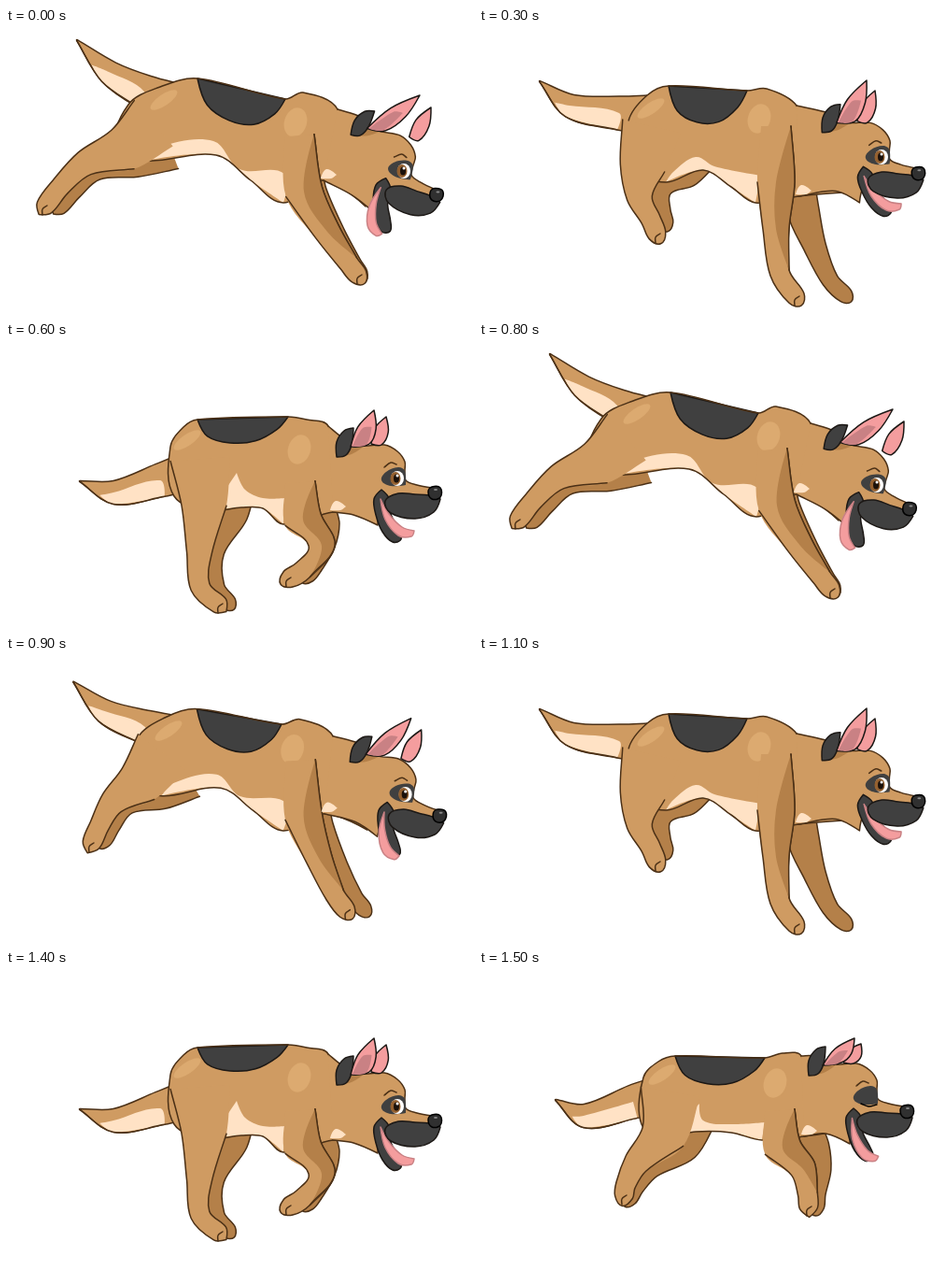
Recreate the animation shown at these times as an HTML page with a canvas. Size 500 by 306 pixels, loop 1600 ms.

```html
<!DOCTYPE html>
<html lang="en">
<head>
<meta charset="utf-8">
<title>Running dog</title>
<style>
html, body { margin: 0; width: 100%; height: 100%; overflow: hidden; background: #fff; }
canvas { display: block; width: 500px; height: 306px; }
</style>
</head>
<body>
<canvas id="stage" width="500" height="306"></canvas>
<script>
const ctx = document.getElementById('stage').getContext('2d');
const TAN = '#cf9b62', SHADE = '#b48049', LIGHT = '#dcaa70', CREAM = '#ffe2c5';
const DARK = '#404040', PINK = '#f49d9e', ROSE = '#c98184', LINE = '#4b3016', INK = '#1c1815';
const STEP = 100, STEPS = 16;

// Limb thickness from body to tip.
const HIND = [32, 24, 13.5, 10.5, 9.5];
const FORE = [16, 20, 14, 10.5, 9.5];
const TAIL = [20, 18, 12.5, 0.5];
const slim = radii => radii.map(r => r * 0.85);

// Key poses. face: eye x, eye y, tilt, jaw turn, tongue turn.
// ears: near tip, far tip, shift of the far base.
const reach = {
  torso: [205, 54, 299, 76, 318, 69, 355, 87, 340, 163, 297, 187, 262, 163, 225, 136, 150, 142, 118, 128, 131, 82, 165, 63],
  cream: [165, 127, 222, 121, 250, 151, 298, 156],
  hind: [158, 102, 125, 130, 84, 145, 58, 170, 41, 192],
  farHind: [175, 125, 135, 140, 95, 152, 72, 175, 56, 193],
  fore: [314, 115, 319, 175, 344, 218, 367, 252, 378, 266],
  farFore: [325, 150, 327, 178, 352, 222, 372, 253, 380, 265],
  tail: [185, 80, 148, 68, 110, 47, 76, 13],
  face: [425, 153, 15, 2, 30], ears: [443, 72, 455, 85, 24], sag: [37]
};
const land = {
  torso: [203, 62, 287, 67, 308, 65, 340, 83, 342, 180, 296, 187, 270, 170, 240, 152, 200, 165, 165, 150, 160, 100, 180, 72],
  cream: [208, 154, 232, 138, 252, 148, 302, 158],
  hind: [185, 105, 175, 150, 172, 182, 184, 205, 191, 222],
  farHind: [232, 130, 215, 155, 195, 172, 196, 195, 200, 210],
  fore: [318, 105, 318, 165, 318, 215, 322, 262, 340, 289],
  farFore: [345, 160, 347, 195, 360, 235, 376, 270, 393, 287],
  tail: [180, 92, 150, 91, 97, 83, 65, 57],
  face: [430, 138, 3, -13, -10], ears: [415, 56, 424, 67, 0], sag: [37]
};
const gather = {
  torso: [205, 67, 298, 75, 318, 74, 345, 88, 325, 197, 268, 192, 258, 178, 244, 165, 215, 165, 175, 155, 156, 108, 182, 74],
  cream: [224, 110, 232, 130, 250, 154, 285, 157],
  hind: [190, 112, 213, 165, 217, 195, 244, 212, 263, 222],
  farHind: [225, 140, 225, 168, 222, 180, 228, 188, 232, 190],
  fore: [305, 150, 287, 192, 269, 232, 268, 268, 281, 285],
  farFore: [335, 175, 332, 198, 322, 235, 321, 268, 336, 285],
  tail: [180, 110, 150, 112, 88, 112, 50, 91],
  face: [424, 148, 6, -8, -4], ears: [399, 67, 415, 76, 0], sag: [30]
};
const push = {
  torso: [205, 83, 302, 80, 322, 83, 345, 90, 350, 182, 297, 195, 275, 178, 252, 177, 220, 180, 180, 165, 176, 112, 190, 91],
  cream: [247, 140, 256, 158, 275, 167, 299, 167],
  hind: [208, 125, 212, 175, 207, 225, 208, 262, 229, 282],
  farHind: [240, 150, 238, 185, 222, 225, 225, 262, 239, 280],
  fore: [315, 150, 318, 190, 338, 218, 318, 244, 302, 254],
  farFore: [338, 175, 340, 195, 340, 218, 330, 240, 322, 251],
  tail: [190, 140, 165, 148, 115, 161, 79, 149],
  face: [418, 146, 0, 0, 0], ears: [394, 73, 407, 80, 0], sag: [26]
};
const float = {
  torso: [210, 92, 306, 94, 325, 89, 345, 92, 348, 178, 303, 182, 270, 174, 232, 173, 200, 178, 174, 165, 176, 115, 192, 98],
  cream: [236, 143, 240, 161, 270, 165, 306, 163],
  hind: [205, 130, 197, 178, 168, 207, 157, 230, 155, 243],
  farHind: [230, 150, 215, 188, 183, 212, 168, 232, 160, 246],
  fore: [322, 150, 325, 190, 347, 213, 352, 240, 353, 255],
  farFore: [352, 165, 358, 190, 365, 215, 362, 240, 361, 255],
  tail: [190, 135, 165, 141, 112, 156, 82, 139],
  face: [417, 136, 0, 0, 12], ears: [402, 73, 409, 79, 0], sag: [29]
};
const POSES = [reach, land, gather, push, float];
// Position of each step of the gallop along the key poses.
const GAIT = [0, 1 / 3, 2 / 3, 1, 2, 2.5, 3, 4];

// Head shapes, measured from the eye.
const SKULL = pairs([-46, 39, -20, 50, -13, 29, 22, 32, 38, 10, 22, 7, 10, 2, 9, -8, 9, -18, 1, -29, -13, -36, -38, -35, -58, -44]);
const JAW = pairs([-24, 22, -16, 12, -8, 21, -6, 38, 2, 54, 5, 65, -4, 68, -15, 57, -22, 39]);
const TONGUE = pairs([-17, 22, -8, 38, 6, 52, 19, 56, 16, 62, 2, 61, -12, 44]);
const MUZZLE = pairs([-12, 24, 2, 16, 20, 17, 35, 18, 47, 22, 40, 36, 20, 43, -6, 37]);
const NOSE = pairs([34, 14, 38, 9, 47, 10, 47, 20, 38, 22]);
const MASK = pairs([-16, 2, -11, -7, 2, -12, 9, -8, 10, 7, -6, 8]);
const BROW = pairs([-13, -12, -6, -17, 0, -15]);
const EAR_BACK = pairs([-64, -23, -64, -39, -56, -51, -46, -54, -48, -36, -54, -25]);
const NAPE = pairs([-64, -23, -52, -32, -34, -35, -48, -26]);
const HINGE = [-20, 20];

function pairs(list) {
  const out = [];
  for (let i = 0; i < list.length; i += 2) out.push([list[i], list[i + 1]]);
  return out;
}

function mix(a, b, f) {
  return a.map((v, i) => v + (b[i] - v) * f);
}

function poseAt(at) {
  const i = Math.floor(at), a = POSES[i], b = POSES[i + 1] || a, out = {};
  for (const key in a) out[key] = mix(a[key], b[key], at - i);
  return out;
}

function turn([x, y], deg, [cx, cy] = [0, 0]) {
  const r = deg * Math.PI / 180, c = Math.cos(r), s = Math.sin(r);
  return [cx + (x - cx) * c - (y - cy) * s, cy + (x - cx) * s + (y - cy) * c];
}

function unit(x, y) {
  const len = Math.hypot(x, y) || 1;
  return [x / len, y / len];
}

// Sharp turns stay corners, the rest is smoothed.
function tangent(a, p, b) {
  const ux = p[0] - a[0], uy = p[1] - a[1], vx = b[0] - p[0], vy = b[1] - p[1];
  return ux * vx + uy * vy < 0 ? [0, 0] : unit(ux + vx, uy + vy);
}

function shape(pts, fill, line, closed = true) {
  const n = pts.length;
  const get = i => closed ? pts[(i + n) % n] : pts[Math.max(0, Math.min(n - 1, i))];
  const dir = pts.map((p, i) => tangent(get(i - 1), p, get(i + 1)));
  ctx.beginPath();
  ctx.moveTo(...pts[0]);
  for (let i = 0; i < (closed ? n : n - 1); i++) {
    const j = (i + 1) % n, p = pts[i], q = pts[j];
    const h = Math.hypot(q[0] - p[0], q[1] - p[1]) / 3;
    ctx.bezierCurveTo(p[0] + dir[i][0] * h, p[1] + dir[i][1] * h,
      q[0] - dir[j][0] * h, q[1] - dir[j][1] * h, ...q);
  }
  if (closed) ctx.closePath();
  if (fill) { ctx.fillStyle = fill; ctx.fill(); }
  if (line) { ctx.strokeStyle = line; ctx.stroke(); }
}

function oval(x, y, rx, ry, color, tilt = 0) {
  ctx.beginPath();
  ctx.ellipse(x, y, rx, ry, tilt, 0, Math.PI * 2);
  ctx.fillStyle = color;
  ctx.fill();
}

// Draws a tapered limb; the outline may skip joints hidden in the body.
function limb(list, radii, fill, skipLeft = 0, skipRight = 0) {
  const mid = pairs(list), last = mid.length - 1, left = [], right = [];
  let d;
  mid.forEach((p, i) => {
    const a = mid[Math.max(0, i - 1)], b = mid[Math.min(last, i + 1)], r = radii[i];
    d = unit(b[0] - a[0], b[1] - a[1]);
    left.push([p[0] - d[1] * r, p[1] + d[0] * r]);
    right.push([p[0] + d[1] * r, p[1] - d[0] * r]);
  });
  const r = radii[last], tip = [mid[last][0] + d[0] * r, mid[last][1] + d[1] * r];
  const edge = [...left, tip, ...right.slice().reverse()];
  shape(edge, fill, '', false);
  shape(edge.slice(skipLeft, edge.length - skipRight), '', LINE, false);
  return { mid, left, right };
}

function toe([x, y]) {
  shape([[x - 2, y + 8], [x - 2, y + 2], [x + 3, y - 2]], '', LINE, false);
}

function ear(a, b, tip) {
  const [dx, dy] = unit(tip[0] - (a[0] + b[0]) / 2, tip[1] - (a[1] + b[1]) / 2);
  const l = mix(a, tip, 0.5), r = mix(b, tip, 0.5), w = 5;
  shape([a, [l[0] + dy * w, l[1] - dx * w], tip, [r[0] - dy * w, r[1] + dx * w], b], PINK, INK);
}

function drawBody(p) {
  const t = pairs(p.torso), [left, right, withers, nape, chest, elbow, under, flank, groin] = t;
  const throat = [p.face[0] - 40, p.face[1] + 38];
  const torso = [...t.slice(0, 4), throat, ...t.slice(4)];

  const tail = limb(p.tail, TAIL, TAN);
  const low = tail.right;
  shape([mix(low[2], low[3], 0.4), tail.mid[2], tail.mid[1], low[1], low[2]], CREAM, '');
  shape([low[1], low[2], low[3]], '', LINE, false);

  limb(p.farHind, slim(HIND), SHADE);
  limb(p.farFore, slim(FORE), SHADE);
  shape(torso, TAN, '');
  oval(withers[0] - 8, withers[1] + 32, 12, 16, LIGHT, 0.3);
  shape([...pairs(p.cream), elbow, under, flank, groin], CREAM, '');

  const sag = (f, k) => {
    const [x, y] = mix(left, right, f);
    return [x, y + p.sag[0] * k];
  };
  shape([left, sag(0.11, 0.7), sag(0.36, 1), sag(0.64, 0.95), sag(0.88, 0.5), right], DARK, INK);
  shape(torso, '', LINE);

  const fore = limb(p.fore, FORE, TAN, 1, 0);
  shape([fore.right[0], fore.right[1], fore.right[2], fore.right[3], fore.mid[2], fore.mid[1]], SHADE, '');
  shape(fore.right.slice(0, 4), '', LINE, false);
  toe(fore.mid[4]);

  const hind = limb(p.hind, HIND, TAN, 0, 1);
  const hip = t[t.length - 1];
  oval(hip[0] + 4, hip[1] + 14, 17, 6, LIGHT, -0.6);
  toe(hind.mid[4]);
  return { chest, nape };
}

function drawHead(p, { chest, nape }, shut) {
  const [ex, ey, tilt, jaw, tongue] = p.face;
  const place = q => {
    const [x, y] = turn(q, tilt);
    return [ex + x, ey + y];
  };
  const put = (pts, swing = 0) => pts.map(q => place(turn(q, swing, HINGE)));
  const [nx, ny, fx, fy, shift] = p.ears;

  shape([chest, ...put(SKULL), nape], TAN, LINE, false);
  const [cx, cy] = chest;
  shape([[cx - 3, cy - 2], [cx + 3, cy - 12], [cx + 14, cy - 6], [cx + 8, cy - 2]], CREAM, '');
  shape(put(NAPE), SHADE, '');
  ear(place([shift - 27, -37]), place([shift - 16, -36]), [fx, fy]);
  shape(put(EAR_BACK), DARK, INK);
  const a = place([-49, -34]), b = place([-29, -37]), tip = [nx, ny];
  ear(a, b, tip);
  shape([mix(a, b, 0.1), mix(a, tip, 0.5), mix(b, tip, 0.5), mix(b, a, 0.15)], ROSE, '');

  shape(put(JAW, jaw), DARK, INK);
  shape(put(TONGUE, tongue), PINK, ROSE);
  shape(put(MUZZLE), DARK, INK);
  shape(put(NOSE), '#303030', '#000');
  oval(...place([42, 12]), 2, 1, '#8a8a8a');
  shape(put(MASK), DARK, '');
  shape(put(BROW), '', LINE, false);

  if (shut) {
    shape([[ex - 8, ey + 7], [ex, ey + 10], [ex + 9, ey + 8]], '', '#000', false);
    return;
  }
  oval(ex + 1, ey, 7, 8, '#fff');
  oval(ex - 1, ey, 5.5, 7, '#94602f');
  oval(ex, ey, 3, 4.5, '#1a100a');
  oval(ex + 1, ey - 3, 1.5, 1.5, '#fff');
}

function draw(step) {
  const p = poseAt(GAIT[step % GAIT.length]);
  ctx.fillStyle = '#fff';
  ctx.fillRect(0, 0, 500, 306);
  ctx.lineWidth = 1.5;
  ctx.lineJoin = ctx.lineCap = 'round';
  drawHead(p, drawBody(p), step === STEPS - 1);
}

const start = performance.now();
let shown = -1;
function tick() {
  const step = Math.floor((performance.now() - start) / STEP) % STEPS;
  if (step !== shown) draw(shown = step);
  requestAnimationFrame(tick);
}
tick();
</script>
</body>
</html>
```
